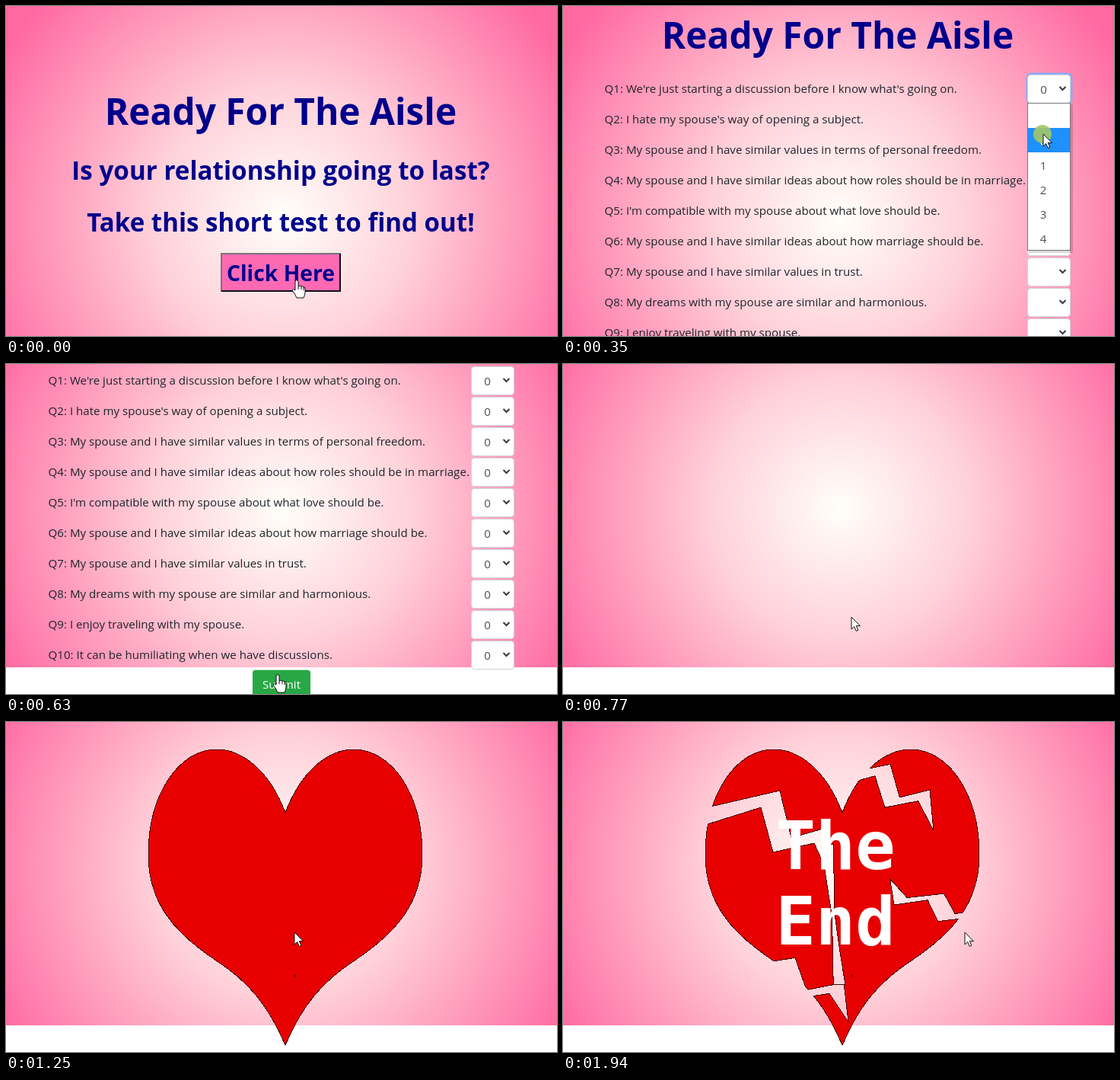
Recreate the animation shown at these times as an HTML page. Size 724 by 433 pixels, loop 2140 ms.

```html
<!DOCTYPE html>
<html lang="en">
<head>
<meta charset="utf-8">
<title>Relationship test</title>
<style>
  html, body { margin: 0; width: 100%; height: 100%; overflow: hidden; background: #fff; }
  svg { display: block; width: 724px; height: 433px; font: 15.13px "Open Sans", "Noto Sans", sans-serif; }
  .bold { font-weight: 700; fill: #00008b; text-anchor: middle; }
  .mid { text-anchor: middle; }
  .block { font: 700 87px "DejaVu Sans Mono", monospace; fill: #fff; text-anchor: middle; }
</style>
</head>
<body>
<svg id="stage" viewBox="0 0 724 433"></svg>
<script>
const LOOP = 2140;
const TICK = 70;
const HOLDS = { 840: 130, 1250: 130, 1660: 150, 1810: 130, 1940: 200 };
const SCROLL = 87;
const stage = document.getElementById('stage');

function add(parent, tag, attrs = {}, text) {
  const el = document.createElementNS('http://www.w3.org/2000/svg', tag);
  for (const key in attrs) el.setAttribute(key, attrs[key]);
  if (text !== undefined) el.textContent = text;
  parent.appendChild(el);
  return el;
}
const group = parent => add(parent, 'g');
const show = (el, on) => el.setAttribute('display', on ? 'inline' : 'none');
const place = (el, x, y) => el.setAttribute('transform', `translate(${x} ${y})`);
const progress = (t, start, end) => Math.min(1, Math.max(0, (t - start) / (end - start)));

// Pink backdrop
const defs = add(stage, 'defs');
const pink = add(defs, 'radialGradient',
  { id: 'pink', gradientUnits: 'userSpaceOnUse', cx: 364, cy: 278, r: 425 });
add(pink, 'stop', { offset: 0, 'stop-color': '#fffffa' });
add(pink, 'stop', { offset: .4, 'stop-color': '#ffd1d9' });
add(pink, 'stop', { offset: 1, 'stop-color': '#ff69a1' });
add(stage, 'rect', { width: 724, height: 433, fill: '#fff' });
const backdrop = add(stage, 'rect', { width: 724, height: 433, fill: 'url(#pink)' });

function heading(parent, text, y, size) {
  add(parent, 'text', { x: 361, y, class: 'bold', 'font-size': size }, text);
}

// Start page
const TITLE = 'Ready For The Aisle';
const startPage = group(stage);
heading(startPage, TITLE, 156, 47.8);
heading(startPage, 'Is your relationship going to last?', 228, 33.2);
heading(startPage, 'Take this short test to find out!', 296, 33.1);
add(startPage, 'rect', { x: 282, y: 324, width: 158, height: 51, fill: '#ff69b4' });
add(startPage, 'path', { d: 'M283 375V325H440', fill: 'none', stroke: '#767676', 'stroke-width': 2 });
add(startPage, 'path', { d: 'M283 374H439V325', fill: 'none', stroke: '#111', 'stroke-width': 2 });
heading(startPage, 'Click Here', 361, 28.3);

// Question page
const QUESTIONS = [
  "We're just starting a discussion before I know what's going on.",
  "I hate my spouse's way of opening a subject.",
  'My spouse and I have similar values in terms of personal freedom.',
  'My spouse and I have similar ideas about how roles should be in marriage.',
  "I'm compatible with my spouse about what love should be.",
  'My spouse and I have similar ideas about how marriage should be.',
  'My spouse and I have similar values in trust.',
  'My dreams with my spouse are similar and harmonious.',
  'I enjoy traveling with my spouse.',
  'It can be humiliating when we have discussions.'
];
const quizPage = group(stage);
heading(quizPage, TITLE, 56, 47.8);
const focusRing = add(quizPage, 'rect', { x: 609.5, y: 88.5, width: 59, height: 40, rx: 6,
  fill: '#80bdff', stroke: '#8fa8ee', 'stroke-width': 2 });
const answers = QUESTIONS.map((question, i) => {
  const y = 108.5 + 40 * i;
  add(quizPage, 'text', { x: 54.5, y: y + 5.5, fill: '#212529' }, `Q${i + 1}: ${question}`);
  add(quizPage, 'rect', { x: 610.5, y: y - 18, width: 56, height: 37, rx: 4, fill: '#fff', stroke: '#ced4da' });
  add(quizPage, 'path', { d: `M652.5 ${y - 2.5}l4 4l4-4`, fill: 'none', stroke: '#343a40', 'stroke-width': 2 });
  return add(quizPage, 'text', { x: 631.5, y: y + 6.5, class: 'mid', fill: '#495057' }, '0');
});
add(quizPage, 'rect', { x: 323, y: 488.5, width: 76, height: 38, rx: 4, fill: '#28a745' });
add(quizPage, 'text', { x: 361, y: 513, class: 'mid', fill: '#fff' }, 'Submit');

const menu = group(quizPage);
add(menu, 'rect', { x: 612, y: 129, width: 58, height: 195, fill: '#000', opacity: .15 });
add(menu, 'rect', { x: 610.5, y: 127.5, width: 56, height: 193, fill: '#fff', stroke: '#777' });
add(menu, 'rect', { x: 611, y: 160, width: 55, height: 32, fill: '#1e90ff' });
for (let n = 0; n < 5; n++) {
  add(menu, 'text', { x: 631, y: 182.5 + 32 * n, class: 'mid', fill: n ? '#495057' : '#fff' }, n);
}

// Heart: one half described from its axis, then mirrored
const AXIS = 367;
const EDGE = { stroke: '#400', 'stroke-width': 1, 'shape-rendering': 'crispEdges' };
const CURVE = [[20, 66], [55, 36], [90, 36], [140, 36], [180, 95], [180, 174],
  [180, 238], [145, 277], [91, 313], [49, 340], [22, 372], [0, 424]];
const half = side => `M${AXIS} 119C` + CURVE.map(([x, y]) => `${AXIS + side * x} ${y}`).join(' ');
const heartShape = half(-1) + half(1);
const heartPage = group(stage);
const heart = add(heartPage, 'path',
  { ...EDGE, d: heartShape, fill: '#e80000', 'vector-effect': 'non-scaling-stroke' });
const speck = add(heartPage, 'path', { d: 'M378 330l3 3l-2 3z', fill: '#800000' });
add(add(defs, 'clipPath', { id: 'inside' }), 'path', { d: heartShape });

// A gap erases the heart and its rim; the dark edge stays inside
function gap(time, points) {
  const g = group(heartPage);
  add(g, 'polygon', { points, fill: 'url(#pink)' });
  add(g, 'polygon', { points, fill: 'none', ...EDGE, 'clip-path': 'url(#inside)' });
  return { g, time };
}

// Lightning bolt around its last corner, tail to the left
const BOLT = [[-155, -27], [-64, -48], [-49, 14], [0, 0], [6, 76], [-19, 21], [-73, 33], [-89, -26], [-162, -3]];
const bolt = (time, x, y, sx, sy) => gap(time, BOLT.map(([u, v]) => [x + u * sx, y + v * sy]).join(' '));

function split(time) {
  const left = [], right = [];
  for (let i = 0; i < 5; i++) {
    const x = 347 + 4 * i, y = 160 + 46 * i, width = 5 + 3 * Math.cos(1.5 * i);
    left.push([x - width, y]);
    right.unshift([x + width, y]);
  }
  return gap(time, [...left, ...right].join(' '));
}
const gaps = [
  bolt(1380, 349, 138, 1, 1),
  bolt(1520, 482, 89, .81, .7),
  bolt(1590, 369, 342, 1, .68),
  bolt(1810, 435, 240, -.9, -.45),
  split(1810)
];

const ending = group(heartPage);
['The', 'End'].forEach((word, i) => add(ending, 'text', { x: 358, y: 193 + 99 * i, class: 'block' }, word));

// Pointer
const pointer = group(stage);
const ripple = add(pointer, 'circle', { r: 12, cx: -1, fill: '#a3c566', opacity: .9 });
const INK = { fill: '#fff', stroke: '#111', 'stroke-width': 1 };
const arrow = add(pointer, 'path', { ...INK, d: 'M0 0V16L3.7 12.6L6.3 18.4L8.8 17.3L6.3 11.6H11.4Z' });
const hand = add(pointer, 'path', { ...INK,
  d: 'M-2 1Q0-2 2 1V8Q4 6 6 8Q8 7 9 9Q11 8 11 11V16Q11 19 9 23H0Q-2 18-6 13Q-5 10-2 13ZM2 8v4M6 8v4M9 9v4' });

// Each move: start, end, destination
const HOME = [382, 360];
const MOVES = [[70, 350, 631, 168], [350, 630, 357, 408], [700, 770, 379, 332],
  [1180, 1250, 379, 276], [1250, 1660, 528, 276]];
const CLICKS = [70, 350, 700];

function pointerAt(t) {
  return MOVES.reduce(([x, y], [start, end, toX, toY]) => {
    const k = progress(t, start, end);
    return [x + (toX - x) * k, y + (toY - y) * k];
  }, HOME);
}

function stepAt(time) {
  let t = 0;
  for (;;) {
    const next = t + (HOLDS[t] || TICK);
    if (next > time) return t;
    t = next;
  }
}

function draw(time) {
  const t = stepAt(time);
  const onStart = t < 140, onHeart = t >= 770, scrolled = t >= 560;

  pink.setAttribute('cy', scrolled ? 190 : 278);
  backdrop.setAttribute('height', scrolled ? 398 : 433);
  show(startPage, onStart);
  show(quizPage, !onStart && !onHeart);
  show(heartPage, t >= 840);

  place(quizPage, scrolled ? 1 : 0, scrolled ? -SCROLL : 0);
  const answered = t < 350 ? 0 : 1 + 9 * progress(t, 350, 560);
  answers.forEach((answer, i) => show(answer, i < answered));
  const choosing = t >= 280 && t < 420;
  show(menu, choosing);
  show(focusRing, choosing);

  const size = .4 + .6 * progress(t, 820, 1180);
  heart.setAttribute('transform', `translate(364 200) scale(${size} ${size ** 1.28}) translate(-364 -200)`);
  show(speck, t >= 1250);
  gaps.forEach(({ g, time }) => show(g, t >= time));
  show(ending, t >= 1940);

  const isHand = onStart || (t >= 630 && !onHeart);
  place(pointer, ...pointerAt(t));
  show(hand, isHand);
  show(arrow, !isHand);
  show(ripple, CLICKS.includes(t));
}

const began = performance.now();
function tick() {
  draw((performance.now() - began) % LOOP);
  requestAnimationFrame(tick);
}
tick();
</script>
</body>
</html>
```
